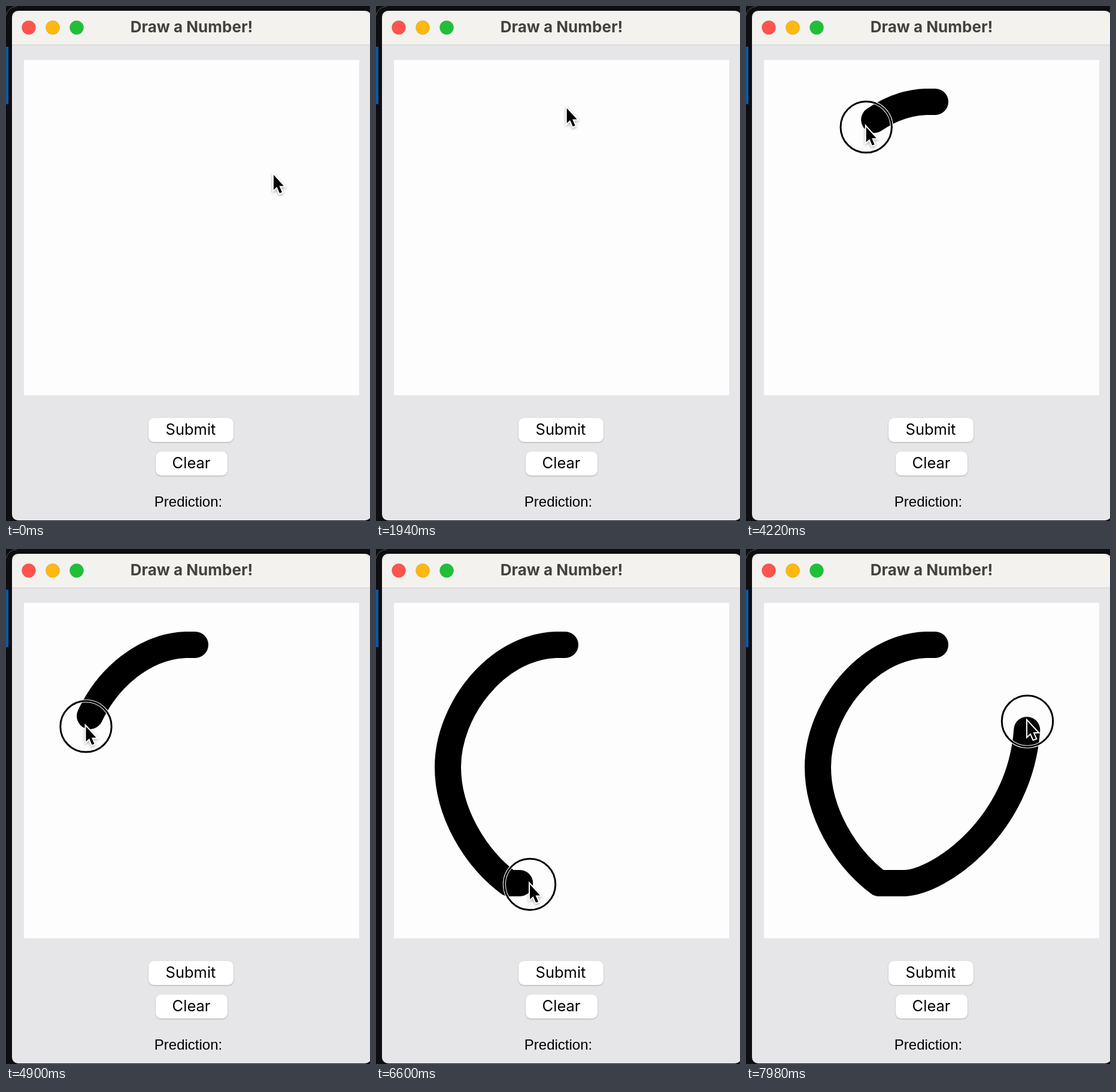
Recreate the animation shown at these times as an HTML page. Size 608 px wide and 860 px high, loop 8000 ms.

```html
<!DOCTYPE html>
<html lang="en">
<head>
<meta charset="utf-8">
<title>Draw a Number</title>
<style>
  html, body { margin: 0; width: 100%; height: 100%; overflow: hidden; background: #0e0e11; }
  svg { display: block; }
  text { text-anchor: middle; font: 25.5px Inter, sans-serif; }
  .title { font-size: 26px; font-weight: bold; fill: #424240; }
  .result { font: 24px "Liberation Sans", sans-serif; }
  .button { fill: #fff; filter: drop-shadow(0 1px 1px rgba(0, 0, 0, .25)); }
  #trail { fill: none; stroke: #000; stroke-width: 44; stroke-linecap: round; stroke-linejoin: round; }
  #ring { fill: none; }
  #pointer { filter: drop-shadow(0 2px 2px rgba(0, 0, 0, .3)); }
</style>
</head>
<body>
<svg width="608" height="860">
  <path d="M0 16Q3 2 18 .5" fill="none" stroke="#55555a"/>
  <rect y="68" width="4" height="96" fill="#0a5aa4"/>

  <rect x="10" y="8" width="600" height="851" rx="10" fill="#e6e6e9"/>
  <path d="M10 65V28Q10 8 30 8H590Q610 8 610 28V65Z" fill="#f3f2ef"/>
  <path d="M10 65H608" stroke="#cdcdd0"/>
  <g stroke-opacity=".12" stroke="#000">
    <circle cx="38" cy="36" r="11.5" fill="#ff544d"/>
    <circle cx="78" cy="36" r="11.5" fill="#ffb80f"/>
    <circle cx="118" cy="36" r="11.5" fill="#1fc038"/>
  </g>
  <text class="title" x="310" y="44">Draw a Number!</text>

  <rect x="30" y="90" width="560" height="560" fill="#fdfdfe"/>
  <rect class="button" x="238" y="688" width="142" height="40" rx="9"/>
  <text x="308.5" y="716">Submit</text>
  <rect class="button" x="250" y="744" width="120" height="40" rx="9"/>
  <text x="309.5" y="772">Clear</text>
  <text class="result" x="304.5" y="836">Prediction:</text>

  <path id="trail" d="M316 160H300C200 164 120 270 120 364C120 440 165 515 222 558H264C326 556 468 455 470 284"/>
  <g id="ring">
    <circle r="42.7" stroke="#fdfdfe" stroke-width="5"/>
    <circle r="42.7" stroke="#000" stroke-width="3"/>
  </g>
  <path id="pointer" d="M0 0V25L5.5 20L10 30.5L14 29L9.5 18.5H17Z"
        stroke="#fff" stroke-width="4" paint-order="stroke"/>
</svg>
<script>
const [trail, ring, pointer] = ['trail', 'ring', 'pointer'].map(id => document.getElementById(id));
const LOOP = 8000, PRESS = 66, FIRST_INK = 70, INK_LAG = 17;

// [step, distance the pointer has gone along the trail]
const drag = [[PRESS, 0], [73, 6], [91, 125], [119, 359], [142, 575], [160, 788], [171, 950]];

// Pictures follow one another in a 20, 100, 20 ms rhythm.
function stepAt(ms) {
  const rest = ms % 140;
  return 3 * Math.floor(ms / 140) + (rest < 20 ? 0 : rest < 120 ? 1 : 2);
}

function distanceAt(step) {
  const i = Math.max(1, drag.findIndex(([end]) => step <= end));
  const [[t0, d0], [t1, d1]] = drag.slice(i - 1, i + 1);
  return d0 + (d1 - d0) * (step - t0) / (t1 - t0);
}

// Before the press the pointer slows down towards the start of the trail.
function approach(step) {
  const left = 1 - step / PRESS;
  return { x: 316 + 131 * left ** 4, y: 160 + 120 * left ** 2.7 };
}

const show = (element, visible) => element.style.display = visible ? '' : 'none';
const place = (element, x, y) => element.setAttribute('transform', `translate(${x} ${y})`);

function render(ms) {
  const step = stepAt(ms);
  const pressed = step >= PRESS;
  const distance = pressed ? distanceAt(step) : 0;
  const { x, y } = pressed ? trail.getPointAtLength(distance) : approach(step);

  show(ring, pressed);
  show(trail, step >= FIRST_INK);
  trail.setAttribute('stroke-dasharray', `${Math.max(1, distance - INK_LAG)} 2000`);
  place(ring, x, y + 2);
  place(pointer, x, y + 2);
}

function tick() {
  render(performance.now() % LOOP);
  requestAnimationFrame(tick);
}
tick();
</script>
</body>
</html>
```
